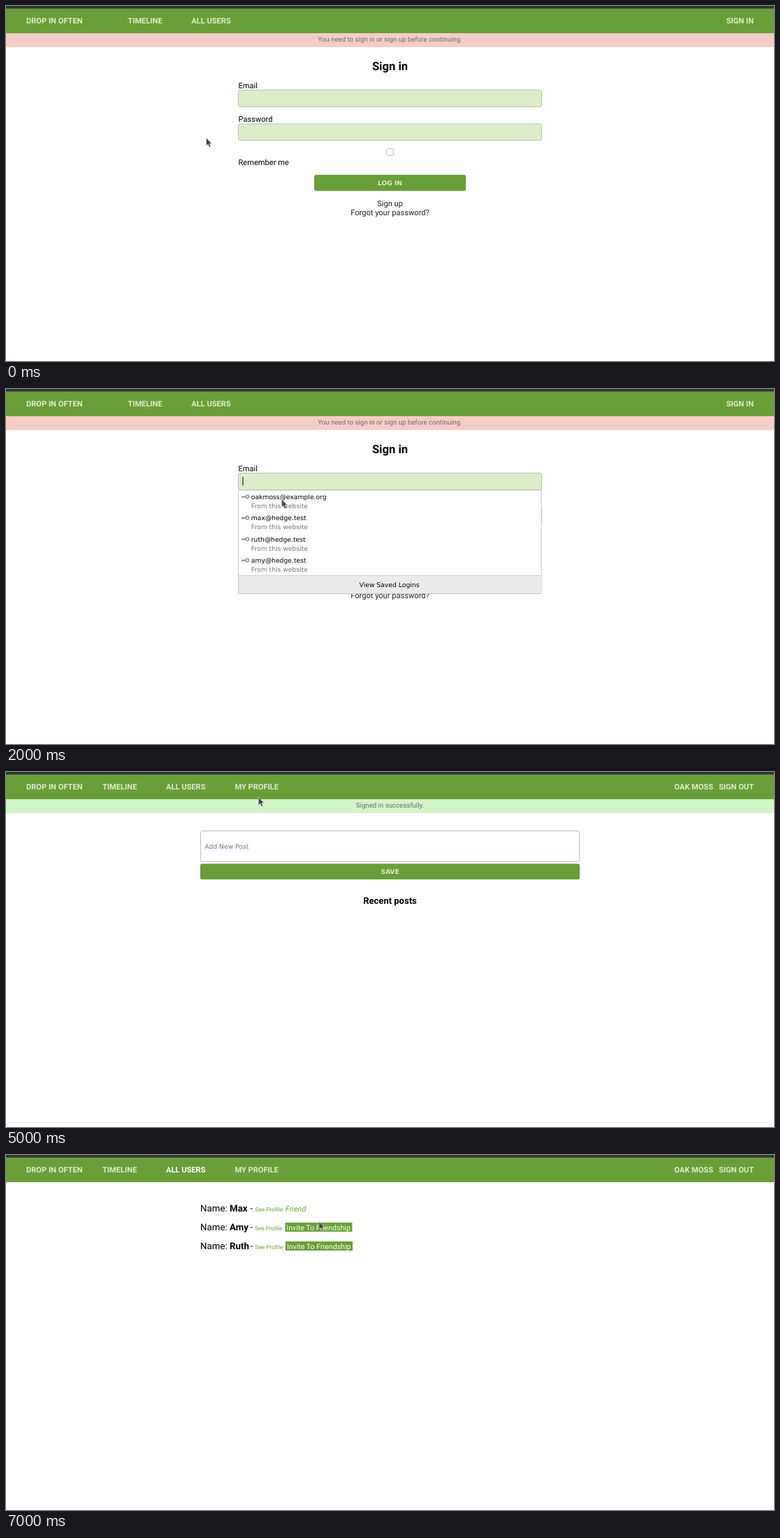
Recreate the animation shown at these times as an HTML page. Size 1099 by 509 pixels, loop 8 s.

```html
<!DOCTYPE html>
<html lang="en">
<head>
<meta charset="utf-8">
<title>Sign-in walkthrough</title>
<style>
html, body { margin: 0; width: 100%; height: 100%; overflow: hidden; background: #fff; }
svg { display: block; width: 100vw; height: 100vh; }
text { font: 11.1px Roboto, sans-serif; text-rendering: geometricPrecision; white-space: pre; }
.nav { font-weight: 700; fill: #dcedc8; }
.nav.on { fill: #fff; }
.flash { font-size: 9.66px; fill: #6d6d6d; }
.h2 { font-size: 16.6px; font-weight: 700; }
.h3 { font-size: 13px; font-weight: 700; }
.link { fill: #212121; }
.ui { font: 9.22px "DejaVu Sans", sans-serif; }
.muted { fill: #757575; }
.btn { font: 700 9.1px "DejaVu Sans", sans-serif; fill: #dcedc8; }
.btn.on { fill: #fff; }
.row { font-size: 13.3px; }
.name { font-size: 13.3px; font-weight: 700; }
.small { font-size: 8.33px; fill: #689f38; }
.friend { font-size: 11px; font-style: italic; fill: #689f38; }
.invite { font-size: 10.6px; fill: #fff; }
</style>
</head>
<body>
<svg id="stage" viewBox="0 0 1099 509" preserveAspectRatio="none"></svg>
<script>
const STEP = 1000, MID = 549.5;
const GREEN = '#689f38', LIME = '#8bc34a', PALE = '#dcedc8', YELLOW = '#fff99d';
const USER = 'oakmoss@example.org';
const LOGINS = [USER, 'max@hedge.test', 'ruth@hedge.test', 'amy@hedge.test'];

const rect = (x, y, w, h, fill, extra = '') =>
  `<rect x="${x}" y="${y}" width="${w}" height="${h}" fill="${fill}" ${extra}/>`;
const text = (x, y, str, cls = '', anchor = 'start') =>
  `<text x="${x}" y="${y}" class="${cls}" text-anchor="${anchor}">${str}</text>`;
const centred = (y, str, cls) => text(MID, y, str, cls, 'middle');
const box = (x, y, w, h, fill, line) =>
  rect(x, y, w, h, fill, `rx="2.5" stroke="${line}"`);

function header(links, right, active) {
  return rect(0, 0, 1099, 39, GREEN) + rect(0, 0, 1099, 3, '#333') +
    rect(0, 3, 1099, 1, '#47602f') +
    text(29, 24.8, 'DROP IN OFTEN', 'nav') +
    links.map(([x, s]) => text(x, 24.8, s, s === active ? 'nav on' : 'nav')).join('') +
    right.map(([x, s]) => text(x, 24.8, s, 'nav', 'end')).join('');
}

const flash = (str, fill) => rect(0, 39, 1099, 20, fill) + centred(51.3, str, 'flash');

function signIn({ filled, hover, focus, popup }) {
  const fill = filled ? YELLOW : PALE, line = filled ? '#cbc797' : '#b9c2b0';
  let out = header([[174.3, 'TIMELINE'], [265.2, 'ALL USERS']], [[1070, 'SIGN IN']]) +
    flash('You need to sign in or sign up before continuing.', '#f6cdc5') +
    centred(92, 'Sign in', 'h2') +
    text(332.5, 117.7, 'Email') + box(332.5, 120.5, 434, 24, fill, line) +
    text(332.5, 166, 'Password') + box(332.5, 169, 434, 23.5, fill, line) +
    box(544.5, 204.5, 10, 10, '#fff', '#bbb') +
    text(332.5, 228.4, 'Remember me') +
    rect(441, 242, 217, 23, hover ? LIME : GREEN, 'rx="2.5"') +
    centred(256.5, 'LOG IN', hover ? 'btn on' : 'btn') +
    centred(286.5, 'Sign up', 'link') + centred(299.7, 'Forgot your password?', 'link');
  if (focus) out += rect(445.5, 247.5, 208, 11, 'none', 'stroke="#c9e4a9" stroke-dasharray="1 .5"');
  if (filled) {
    out += text(338.5, 135.6, USER, 'ui');
    for (let i = 0; i < 8; i++) out += `<circle cx="${342.9 + i * 8.05}" cy="181.5" r="3.65"/>`;
  }
  return out + (popup ? loginList() : '');
}

function loginList() {
  const key = y => `<g fill="none" stroke="#858585" stroke-width="1.3">
    <circle cx="345.4" cy="${y}" r="2.2"/><path d="M337 ${y}H343M338.3 ${y}v2M340.8 ${y}v2"/></g>`;
  return rect(338.5, 126, 1, 12.5, '#000') +
    rect(332.5, 145, 433.5, 148.5, '#fff', 'stroke="#c4c4c4"') +
    LOGINS.map((mail, i) => {
      const y = 154.3 + i * 30.4;
      return key(y) + text(350.8, y + 3.4, mail, 'ui') +
        text(350.8, y + 16.6, 'From this website', 'ui muted');
    }).join('') +
    rect(333, 267.5, 432.5, 25.5, '#ebebeb') + rect(333, 267, 432.5, 1, '#cfcfcf') +
    text(548.5, 283.6, 'View Saved Logins', 'ui', 'middle');
}

const memberHeader = active => header(
  [[138, 'TIMELINE'], [229, 'ALL USERS'], [327.4, 'MY PROFILE']],
  [[1012, 'OAK MOSS'], [1070, 'SIGN OUT']], active);

const timeline = ({ active }) => memberHeader(active) +
  flash('Signed in successfully.', '#d2f5c6') +
  box(278.5, 84.5, 542, 44, '#fff', '#bbb') +
  text(284.3, 109.8, 'Add New Post', 'ui muted') +
  rect(278, 131.5, 543, 22.5, GREEN, 'rx="2.5"') +
  centred(146, 'SAVE', 'btn') + centred(189, 'Recent posts', 'h3');

const users = ({ active }) => memberHeader(active) +
  ['Max', 'Amy', 'Ruth'].map((name, i) => {
    const y = 80.5 + i * 27.05, x = i === 1 ? 399.4 : 400;
    return text(278, y, 'Name:', 'row') + text(320, y, name, 'name') +
      text(349.6, y, '-', 'row') + text(x - 43.5, y, 'See Profile', 'small') +
      (i ? rect(x, y - 10.6, 96, 13, GREEN) + text(x + 1.9, y, 'Invite To Friendship', 'invite')
         : text(x, y, 'Friend', 'friend'));
  }).join('');

const pointer = ([x, y]) => `<path transform="translate(${x} ${y})" fill="#444"
  stroke="#d8d8d8" stroke-width=".7" stroke-linejoin="round"
  d="M.5 .5V11.8L3 9.6L4.9 13.8L6.9 12.9L5.1 8.8H8.5Z"/>`;

const steps = [
  { view: signIn, at: [286, 188.6] },
  { view: signIn, at: [427, 153.2] },
  { view: signIn, at: [394, 157.6], popup: true },
  { view: signIn, at: [500, 249.3], filled: true, hover: true },
  { view: signIn, at: [511.7, 256.6], filled: true, hover: true, focus: true },
  { view: timeline, at: [360.8, 35.8] },
  { view: timeline, at: [263, 20], active: 'ALL USERS' },
  { view: users, at: [447.3, 95], active: 'ALL USERS' }
];

const stage = document.getElementById('stage');
const start = performance.now();
let shown = -1;
function draw() {
  const i = Math.floor((performance.now() - start) / STEP) % steps.length;
  if (i !== shown) {
    stage.innerHTML = steps[i].view(steps[i]) + pointer(steps[i].at);
    shown = i;
  }
  requestAnimationFrame(draw);
}
draw();
</script>
</body>
</html>
```
